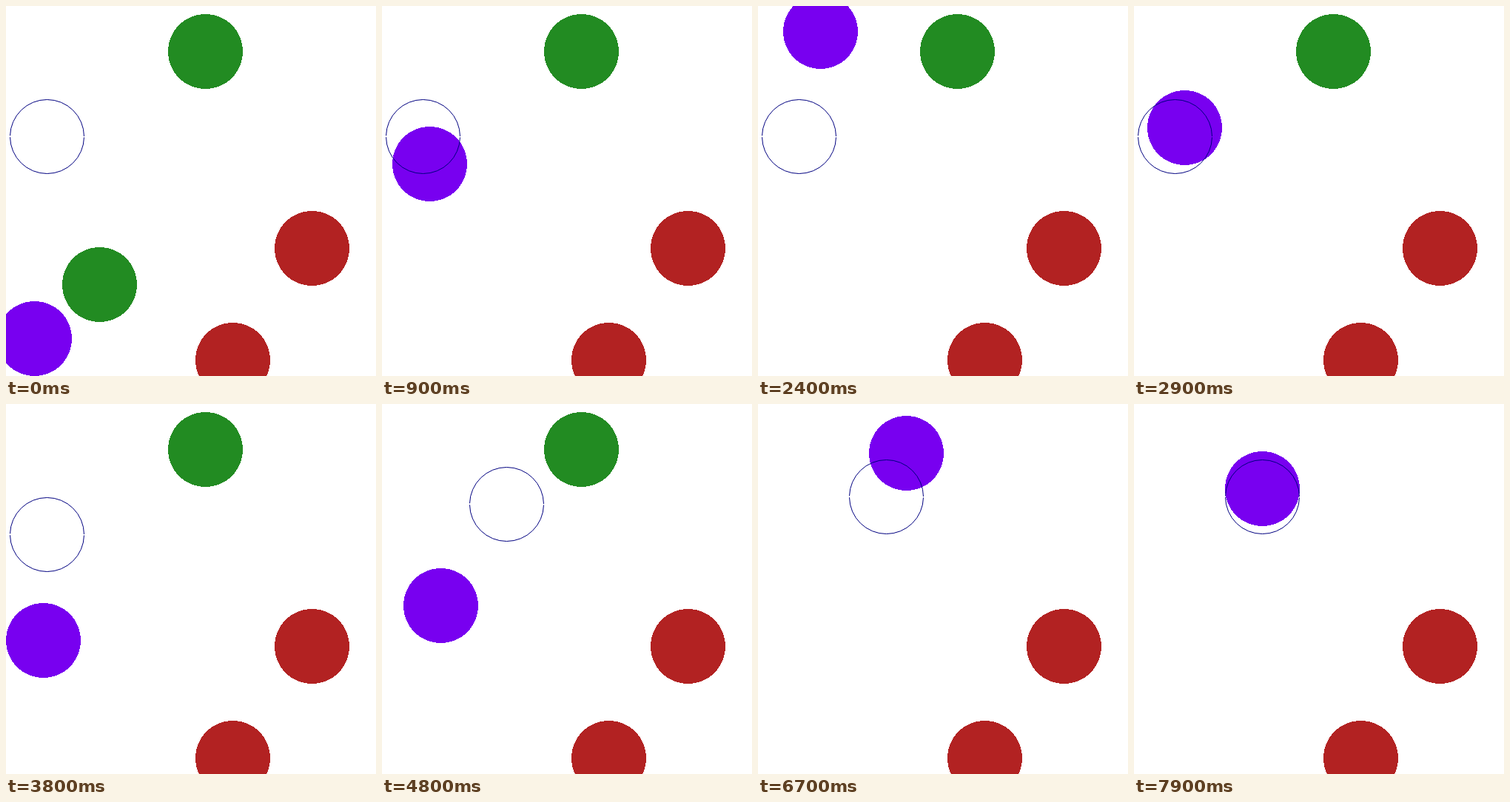
An HTML page for the animation above (8000 ms loop, 500 by 500 pixels).

```html
<!DOCTYPE html>
<html lang="en">
<head>
<meta charset="utf-8">
<title>Ball on a spring</title>
<style>
  html, body { margin: 0; width: 100%; height: 100%; overflow: hidden; background: #fff; }
  svg { display: block; width: 100%; height: 100%; }
</style>
</head>
<body>
<svg viewBox="0 0 500 500">
  <g shape-rendering="crispEdges">
    <g fill="#b22222">
      <circle cx="413.5" cy="327.5" r="50.5"/>
      <circle cx="306.5" cy="478.5" r="50.5"/>
    </g>
    <g fill="#228b22">
      <circle id="lowGreen" cx="126.5" cy="376.5" r="50.5"/>
      <circle id="highGreen" cx="269.5" cy="61.5" r="50.5"/>
    </g>
    <circle id="ball" r="50.5" fill="#7800f0"/>
  </g>
  <circle id="ring" r="50" fill="none" stroke="#000080" stroke-width="1"
          stroke-dasharray="155.08 2" stroke-dashoffset="-1"/>
</svg>
<script>
const STEP = 100, STEPS = 80;
const LOW_HIT = 4, HIGH_HIT = 64;

// Half a swing of a damped spring, from one turning point to the next.
const swing = s => (1 - Math.cos(Math.PI * s ** 0.863)) / 2;
const pull = s => s ** 1.55;
const coast = s => Math.sin(Math.PI / 2 * s);
const linear = s => s;

// The ball swings twice, is pulled through the ring's new place, then swings back.
const ballStops = [
  { at: 0, x: 38.5, y: 449.5 },
  { at: 20, x: 90.5, y: -19.5, ease: swing },
  { at: 39, x: 50.5, y: 321.5, ease: swing },
  { at: 61, x: 168, y: 125.5, ease: pull },
  { at: 70.5, x: 206.5, y: 55.5, ease: coast },
  { at: 89.5, x: 140.5, y: 173.5, ease: swing }
];
const ringStops = [
  { at: 41, x: 55.5, y: 176.5 },
  { at: 45, x: 151.5, y: 163.5, ease: linear },
  { at: 49, x: 173.5, y: 125.5, ease: linear }
];

const byId = id => document.getElementById(id);
const [ball, ring, lowGreen, highGreen] =
  ['ball', 'ring', 'lowGreen', 'highGreen'].map(byId);

// Circle centres sit in the middle of a pixel.
const snap = v => Math.round(v - 0.5) + 0.5;

function place(circle, stops, t) {
  const next = Math.max(1, stops.findIndex(stop => stop.at > t));
  const i = t >= stops.at(-1).at ? stops.length - 1 : next;
  const from = stops[i - 1], to = stops[i];
  const s = Math.min(1, Math.max(0, (t - from.at) / (to.at - from.at)));
  const k = to.ease(s);
  circle.setAttribute('cx', snap(from.x + (to.x - from.x) * k));
  circle.setAttribute('cy', snap(from.y + (to.y - from.y) * k));
}

function show(circle, visible) {
  circle.setAttribute('visibility', visible ? 'visible' : 'hidden');
}

function draw(ms) {
  const t = Math.floor(ms / STEP) % STEPS;
  place(ball, ballStops, t);
  place(ring, ringStops, t);
  show(lowGreen, t < LOW_HIT);
  show(highGreen, t < HIGH_HIT);
}

const start = performance.now();
function tick() {
  draw(performance.now() - start);
  requestAnimationFrame(tick);
}
tick();
</script>
</body>
</html>
```
